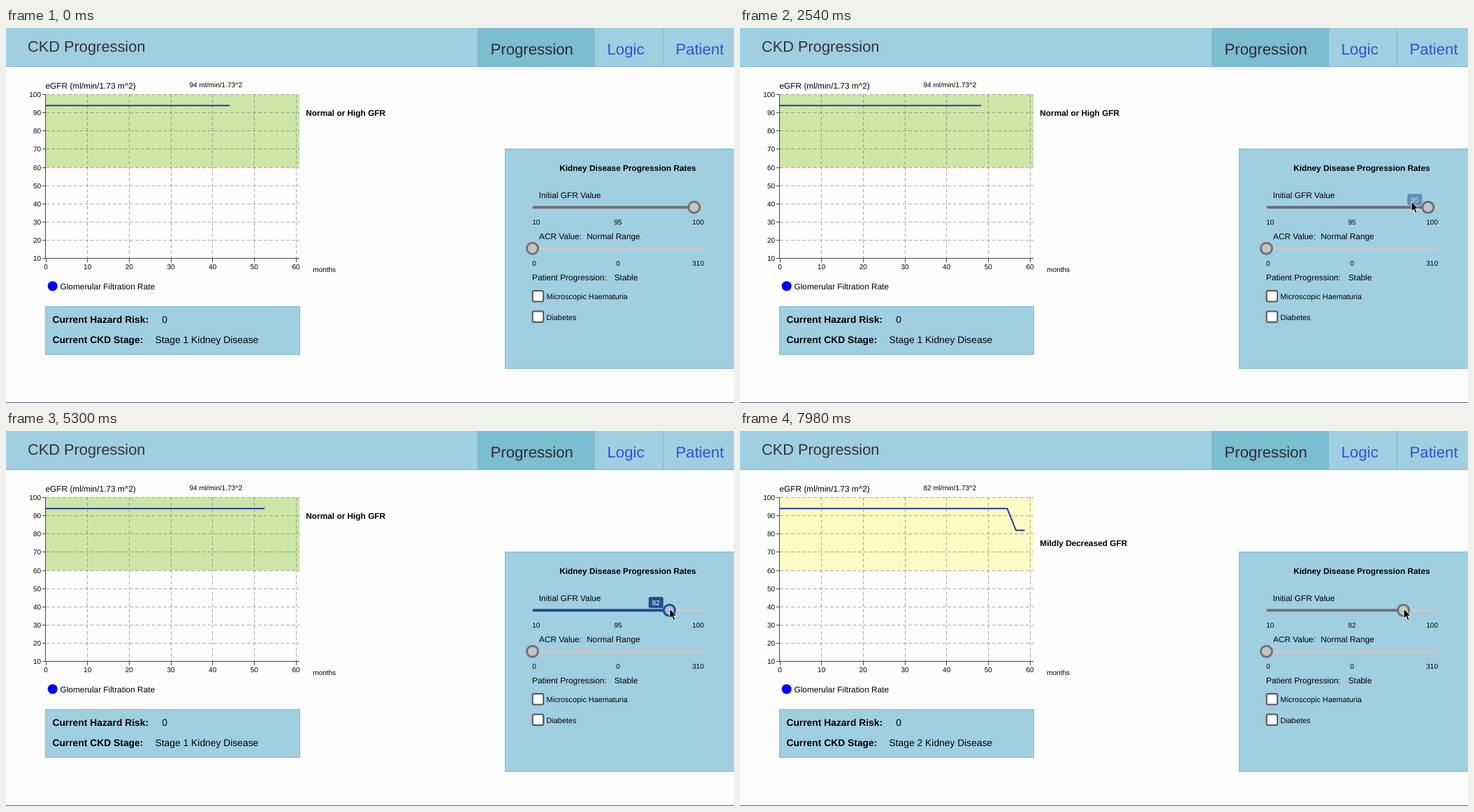
Write an HTML page that moves like this. It is 1042x538 px and loops after 8 s.

```html
<!DOCTYPE html>
<html lang="en">
<head>
<meta charset="utf-8">
<title>CKD Progression</title>
<style>
  html, body { margin: 0; width: 100%; height: 100%; overflow: hidden; background: #fdfdfd; }
  svg { display: block; }
  text { font-family: Arial, "Liberation Sans", sans-serif; font-size: 11.85px; fill: #000; text-rendering: geometricPrecision; white-space: pre; }
  .title { font-size: 21.8px; fill: #333; }
  .tab { font-size: 22.2px; fill: #3050d8; }
  .on { fill: #2d2d2d; }
  .small { font-size: 10px; }
  .check { font-size: 10.85px; }
  .info { font-size: 13.85px; }
  .bold { font-weight: bold; }
  .mid { text-anchor: middle; }
  .end { text-anchor: end; }
  .box { fill: #a0cfe1; stroke: #7cbcd2; }
  .grid { stroke: #5a5a72; stroke-opacity: .5; stroke-dasharray: 5 3; }
  .axis { stroke: #444; fill: none; }
  .rail { stroke: #c8c8c8; stroke-width: 4; stroke-linecap: round; }
  .knob { fill: #c4c4c4; stroke: #737373; stroke-width: 3; }
</style>
</head>
<body>
<svg id="stage" width="1042" height="538" viewBox="0 0 1042 538">
  <rect width="1042" height="56" fill="#a0cfe1"/>
  <rect x="675" width="167" height="56" fill="#7bbdd1"/>
  <path d="M0 55.5H1042M842.5 0V55M940.5 0V55" stroke="#7cbcd2"/>
  <path d="M0 537.5H1042" stroke="#666"/>
  <rect id="band" x="57" y="95.5" width="363" height="104.6"/>
  <g id="chart"></g>
  <path id="curve" fill="none" stroke="#2438b0" stroke-width="2"/>
  <circle cx="66.7" cy="370.2" r="7" fill="#00f"/>
  <rect class="box" x="56.5" y="399.5" width="364" height="69"/>
  <rect class="box" x="714.5" y="173.5" width="340" height="315"/>
  <path class="rail" d="M755.5 257.2H997M755.5 316.2H997"/>
  <path id="fill" stroke-width="4" stroke-linecap="round"/>
  <circle id="knob" class="knob" cy="257.2" r="8"/>
  <circle class="knob" cx="753.5" cy="316.2" r="8"/>
  <g fill="#fff" stroke="#555" stroke-width="2">
    <rect x="753.7" y="377" width="15.5" height="15.5" rx="2"/>
    <rect x="753.7" y="406.5" width="15.5" height="15.5" rx="2"/>
  </g>
  <g id="labels"></g>
  <g id="tip">
    <rect x="-10.5" y="238" width="21" height="16" rx="2.5" fill="#22508f"/>
    <text id="tipText" class="small mid" y="249.7" style="fill:#fff"></text>
  </g>
  <path id="cursor" d="M0 0V14.2L3.2 11.2L5.7 16.8L8.1 15.8L5.7 10.3H10Z" fill="#000" stroke="#fff" stroke-width="1"/>
</svg>
<script>
const NS = 'http://www.w3.org/2000/svg';
const $ = id => document.getElementById(id);
const LOOP = 8000;

function add(parent, tag, attrs, text) {
  const el = document.createElementNS(NS, tag);
  for (const k in attrs) el.setAttribute(k, attrs[k]);
  if (text !== undefined) el.textContent = text;
  return $(parent).appendChild(el);
}
const label = (x, y, text, cls = '') => add('labels', 'text', { x, y, class: cls }, text);

const px = month => 57 + month * 5.967;
const py = gfr => 95.5 + (100 - gfr) * 2.615;

// Grid, axes and ticks
for (let v = 10; v <= 100; v += 10) {
  const y = Math.round(py(v) - .5) + .5;
  if (v > 10) add('chart', 'path', { class: 'grid', d: `M57 ${y}H420` });
  add('chart', 'path', { class: 'axis', d: `M52 ${y}H57` });
  label(50, y + 3, v, 'small end');
}
for (let m = 0; m <= 60; m += 10) {
  const x = Math.round(px(m) - .5) + .5;
  if (m) add('chart', 'path', { class: 'grid', d: `M${x} 95V330` });
  add('chart', 'path', { class: 'axis', d: `M${x} 331V336` });
  label(px(m), 346, m, 'small mid');
}
add('chart', 'path', { class: 'axis', d: 'M56.5 95V330.5H420' });

label(31, 34, 'CKD Progression', 'title');
label(693.5, 38, 'Progression', 'tab on');
label(860.5, 38, 'Logic', 'tab');
label(958.5, 38, 'Patient', 'tab');

label(56.5, 87, 'eGFR (ml/min/1.73 m^2)');
const reading = label(262.5, 85, '', 'small');
const verdict = label(429.3, 126, '', 'bold');
label(439.3, 350, 'months', 'small');
label(77.5, 375, 'Glomerular Filtration Rate');

label(66.4, 423, 'Current Hazard Risk:', 'info bold');
label(223.3, 423, '0', 'info');
label(66.4, 452, 'Current CKD Stage:', 'info bold');
const stageText = label(213.5, 452, '', 'info');

label(792.2, 205, 'Kidney Disease Progression Rates', 'bold');
label(762.8, 244, 'Initial GFR Value');
label(753.3, 281.5, '10', 'small');
const initial = label(876, 281.5, '', 'small mid');
label(999, 281.5, '100', 'small end');
label(763, 303, 'ACR Value:');
label(831.3, 303, 'Normal Range');
label(753.3, 340.5, '0', 'small');
label(876, 340.5, '0', 'small mid');
label(999, 340.5, '310', 'small end');
label(753, 362, 'Patient Progression:');
label(870.7, 362, 'Stable');
label(773.6, 389, 'Microscopic Haematuria', 'check');
label(773.6, 418.7, 'Diabetes', 'check');

const ramp = (t, a, b) => Math.min(1, Math.max(0, (t - a) / (b - a)));
const mix = (a, b, u) => `rgb(${a.map((v, i) => Math.round(v + (b[i] - v) * u))})`;

// Pointer stops: time, x, y
const route = [
  [860, 1046, 229], [1280, 1013.7, 232], [1700, 1013.7, 232], [2400, 961, 249],
  [2700, 961, 249], [3300, 955, 255], [4000, 955, 255], [4350, 950, 255]
];
function pointer(t) {
  let [, x, y] = route[0];
  for (let i = 1; i < route.length; i++) {
    const [a, x0, y0] = route[i - 1], [b, x1, y1] = route[i];
    if (t < a) break;
    const u = ramp(t, a, b), e = u * u * (3 - 2 * u);
    x = x0 + (x1 - x0) * e;
    y = y0 + (y1 - y0) * e;
  }
  return [x, y];
}

const FIRST_TICK = 1000, TICK = 1100, STEP = 12.5, DROP = 6;
const setText = (el, s) => { if (el.textContent !== s) el.textContent = s; };

function draw(t) {
  const ticks = t < FIRST_TICK ? 0 : 1 + Math.floor((t - FIRST_TICK) / TICK);
  const low = ticks >= DROP;
  const end = k => 320 + k * STEP;
  let d = `M57 ${py(94)}H${end(Math.min(ticks, DROP - 1))}`;
  if (low) d += `L${end(DROP)} ${py(82)}H${end(ticks)}`;
  $('curve').setAttribute('d', d);
  $('band').setAttribute('fill', low ? '#fdfbc2' : '#cde6a6');
  setText(reading, `${low ? 82 : 94} ml/min/1.73^2`);
  setText(verdict, low ? 'Mildly Decreased GFR' : 'Normal or High GFR');
  verdict.setAttribute('y', low ? 165 : 126);
  setText(stageText, `Stage ${low ? 2 : 1} Kidney Disease`);
  setText(initial, low ? '82' : '95');

  const value = t < 4500 ? 95 : 82;
  const x = 753.5 + (value - 10) / 90 * 245;
  const focus = ramp(t, 2400, 2680) * (1 - ramp(t, 5800, 6085));
  const tint = focus ** 3;
  const blue = mix([115, 115, 115], [32, 76, 143], tint);
  $('fill').setAttribute('d', `M755.5 257.2H${x}`);
  $('fill').setAttribute('stroke', blue);
  $('knob').setAttribute('cx', x);
  $('knob').style.stroke = blue;
  $('knob').style.fill = mix([196, 196, 196], [168, 188, 220], tint);
  document.querySelector('.rail').style.stroke = mix([200, 200, 200], [200, 200, 200], 0);
  $('tip').setAttribute('transform', `translate(${x - 19.2} 0)`);
  $('tip').setAttribute('opacity', focus);
  setText($('tipText'), String(value));

  const [cx, cy] = pointer(t);
  $('cursor').setAttribute('transform', `translate(${cx} ${cy})`);
}

const start = performance.now();
function frame() {
  draw((performance.now() - start) % LOOP);
  requestAnimationFrame(frame);
}
frame();
</script>
</body>
</html>
```
